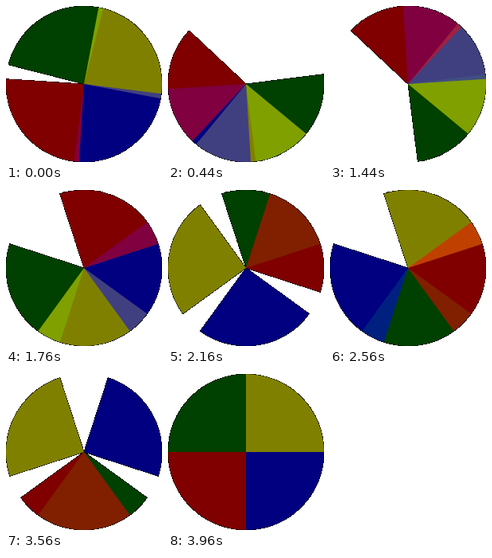
Recreate the animation shown at these times as an HTML page with a canvas. Size 196 by 196 pixels, loop 4000 ms.

```html
<!DOCTYPE html>
<html lang="en">
<head>
<meta charset="utf-8">
<title>Turning quarters</title>
<style>
  html, body { margin: 0; width: 100%; height: 100%; overflow: hidden; background: #fff; }
  canvas { display: block; width: 196px; height: 196px; }
</style>
</head>
<body>
<canvas width="196" height="196"></canvas>
<script>
const SIZE = 196, R = SIZE / 2;
const STEP_MS = 40, STEPS = 100;
const QUARTER = Math.PI / 2;

// Painted back to front; speed is in turns per loop.
const sectors = [
  { color: 'rgba(0,128,0,.5)',   start: 2, speed: 4 },
  { color: 'rgba(255,255,0,.5)', start: 3, speed: 3 },
  { color: 'rgba(0,0,255,.5)',   start: 0, speed: 2 },
  { color: 'rgba(255,0,0,.5)',   start: 1, speed: 1 }
];

const ctx = document.querySelector('canvas').getContext('2d', { willReadFrequently: true });

function drawSector({ color, start, speed }, step) {
  const turned = step * speed % STEPS;
  const angle = start * QUARTER + turned / STEPS * 2 * Math.PI;
  ctx.fillStyle = color;
  ctx.beginPath();
  ctx.moveTo(R, R);
  ctx.arc(R, R, R, angle, angle + QUARTER);
  ctx.fill();
}

// Every touched pixel becomes opaque as if painted on black, the rest white.
function flatten() {
  const image = ctx.getImageData(0, 0, SIZE, SIZE);
  const px = image.data;
  for (let i = 0; i < px.length; i += 4) {
    const alpha = px[i + 3];
    for (let c = i; c < i + 3; c++) px[c] = alpha ? px[c] * alpha / 255 : 255;
    px[i + 3] = 255;
  }
  ctx.putImageData(image, 0, 0);
}

let shown = -1;

function render() {
  const step = (Math.floor(performance.now() / STEP_MS) + 1) % STEPS;
  if (step !== shown) {
    shown = step;
    ctx.clearRect(0, 0, SIZE, SIZE);
    sectors.forEach(sector => drawSector(sector, step));
    flatten();
  }
  requestAnimationFrame(render);
}

render();
</script>
</body>
</html>
```
